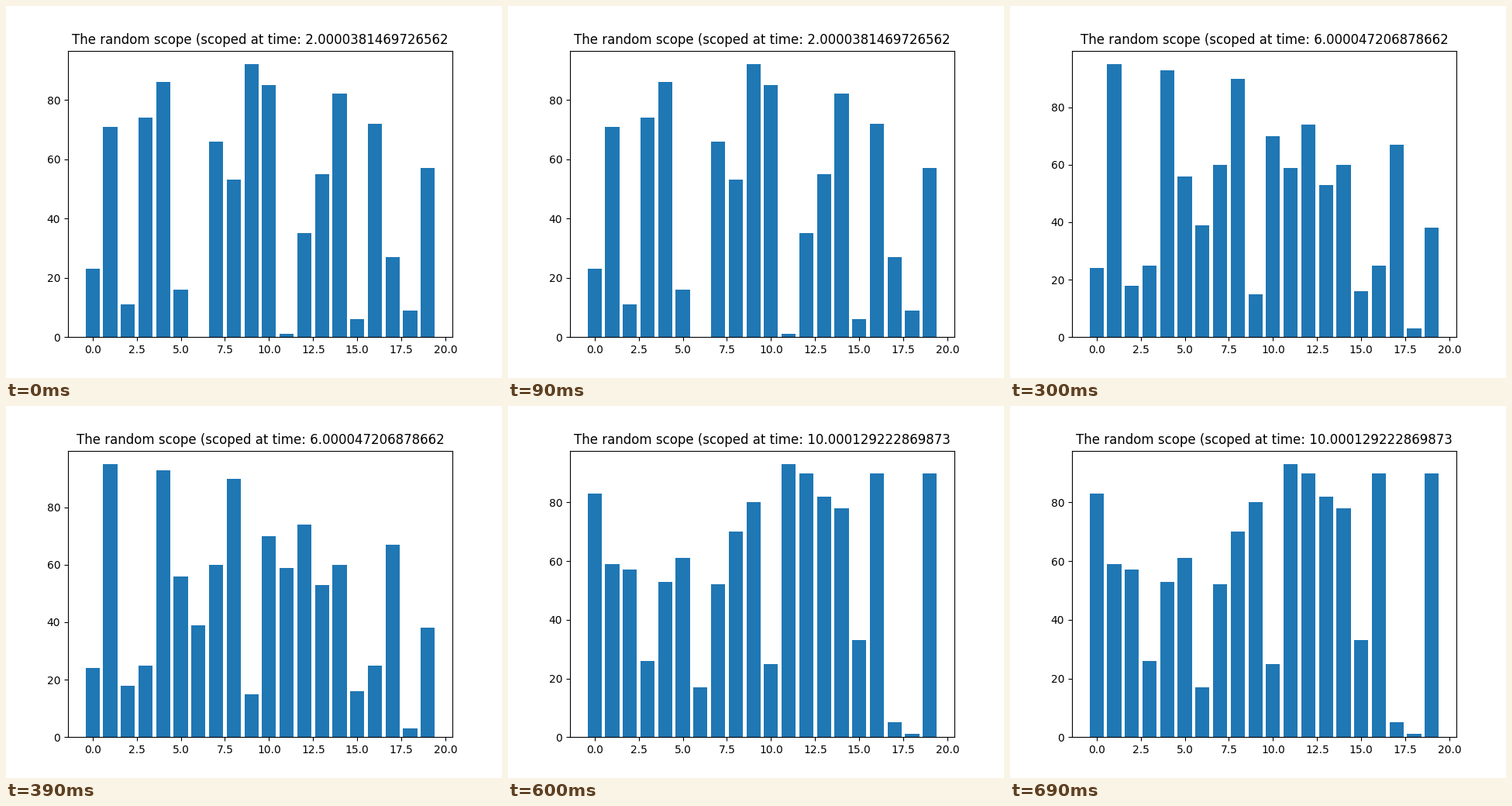
Animation, 640 px wide and 480 px high, one loop 750 ms. Source, as a matplotlib script:

```python
import matplotlib.pyplot as plt
from matplotlib.animation import FuncAnimation

# Each scan: the time it was taken and the height of its 20 bars.
SCANS = [
    ("2.0000381469726562",
     [23, 71, 11, 74, 86, 16, 0, 66, 53, 92, 85, 1, 35, 55, 82, 6, 72, 27, 9, 57]),
    ("4.000042200088501",
     [67, 26, 15, 41, 52, 20, 77, 60, 7, 37, 31, 71, 97, 23, 46, 25, 84, 24, 83, 82]),
    ("6.000047206878662",
     [24, 95, 18, 25, 93, 56, 39, 60, 90, 15, 70, 59, 74, 53, 60, 16, 25, 67, 3, 38]),
    ("8.00005316734314",
     [54, 75, 27, 18, 50, 56, 92, 72, 86, 11, 99, 31, 20, 79, 77, 43, 20, 73, 75, 5]),
    ("10.000129222869873",
     [83, 59, 57, 26, 53, 61, 17, 52, 70, 80, 25, 93, 90, 82, 78, 33, 90, 5, 1, 90]),
]

fig, ax = plt.subplots(figsize=(6.4, 4.8), dpi=100)


def draw(i):
    stamp, heights = SCANS[i]
    ax.clear()
    ax.bar(range(len(heights)), heights, color="#1f77b4")
    ax.set_title(f"The random scope (scoped at time: {stamp}")
    return []


ani = FuncAnimation(fig, draw, frames=len(SCANS), init_func=lambda: draw(0),
                    interval=150, repeat=True, repeat_delay=0)
plt.show()
```
